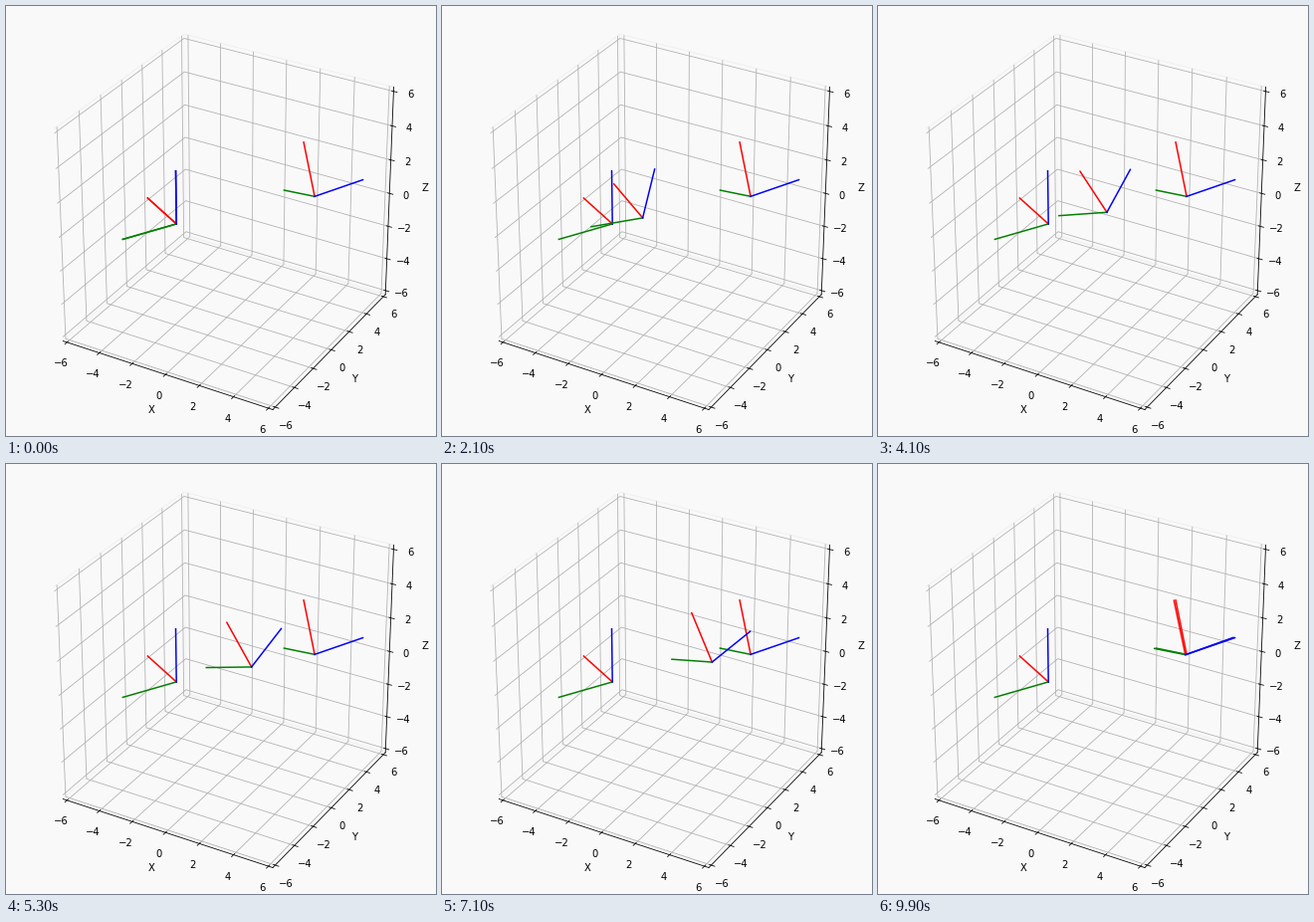
A matplotlib script that plays this animation: 432 px wide and 432 px high, repeating every 10000 ms.

```python
import numpy as np
import matplotlib.pyplot as plt
from matplotlib.animation import FuncAnimation

FRAMES = 100
AXIS_LEN = 3.0
BACKGROUND = "#f9f9f9"
UNIT_CUBE = np.sqrt(3) / 1.8294640721620434  # zoom giving a box of side 1


def rot(axis, degrees):
    """Rotation matrix about an arbitrary axis (Rodrigues)."""
    x, y, z = np.asarray(axis, float) / np.linalg.norm(axis)
    k = np.array([[0, -z, y], [z, 0, -x], [-y, x, 0]])
    a = np.radians(degrees)
    return np.eye(3) + np.sin(a) * k + (1 - np.cos(a)) * k @ k


X, Y, Z = np.eye(3)
R_START, P_START = rot(Z, 150), np.array([0.0, -5.0, 2.0])
R_END, P_END = rot(Z, 135) @ rot(Y, -45) @ rot(X, 45), np.array([3.0, 4.0, 0.0])

# Axis and angle of the turn from the start pose to the end pose
turn = R_START.T @ R_END
TURN_ANGLE = np.degrees(np.arccos((np.trace(turn) - 1) / 2))
TURN_AXIS = [turn[2, 1] - turn[1, 2], turn[0, 2] - turn[2, 0], turn[1, 0] - turn[0, 1]]


def pose(s):
    r = R_START @ rot(TURN_AXIS, s * TURN_ANGLE)
    return r, (1 - s) * P_START + s * P_END


def place(lines, r, p):
    for line, direction in zip(lines, r.T):
        line.set_data_3d(*np.column_stack([p, p + AXIS_LEN * direction]))


def make_triad(r, p):
    lines = [ax.plot([], [], [], color=c, lw=1.5)[0] for c in "rgb"]
    place(lines, r, p)
    return lines


fig = plt.figure(figsize=(6, 6), dpi=72, facecolor=BACKGROUND)
ax = fig.add_axes([0, 0, 1, 1], projection="3d", facecolor=BACKGROUND)
ax.view_init(elev=30, azim=-60)
ax.set_box_aspect((1, 1, 1), zoom=UNIT_CUBE)

make_triad(R_START, P_START)
make_triad(R_END, P_END)
moving = make_triad(R_START, P_START)

ticks = np.arange(-6, 7, 2)
ax.set(xlim=(-6.25, 6.25), ylim=(-6.25, 6.25), zlim=(-6.25, 6.25),
       xticks=ticks, yticks=ticks, zticks=ticks,
       xlabel="X", ylabel="Y", zlabel="Z")
for axis in (ax.xaxis, ax.yaxis, ax.zaxis):
    axis.set_pane_color(BACKGROUND)
    axis.pane.set_edgecolor("#f0f0f0")


def update(i):
    place(moving, *pose(i / FRAMES))
    return moving


anim = FuncAnimation(fig, update, frames=FRAMES, interval=100, repeat=True,
                     repeat_delay=0, blit=False)
plt.show()
```
